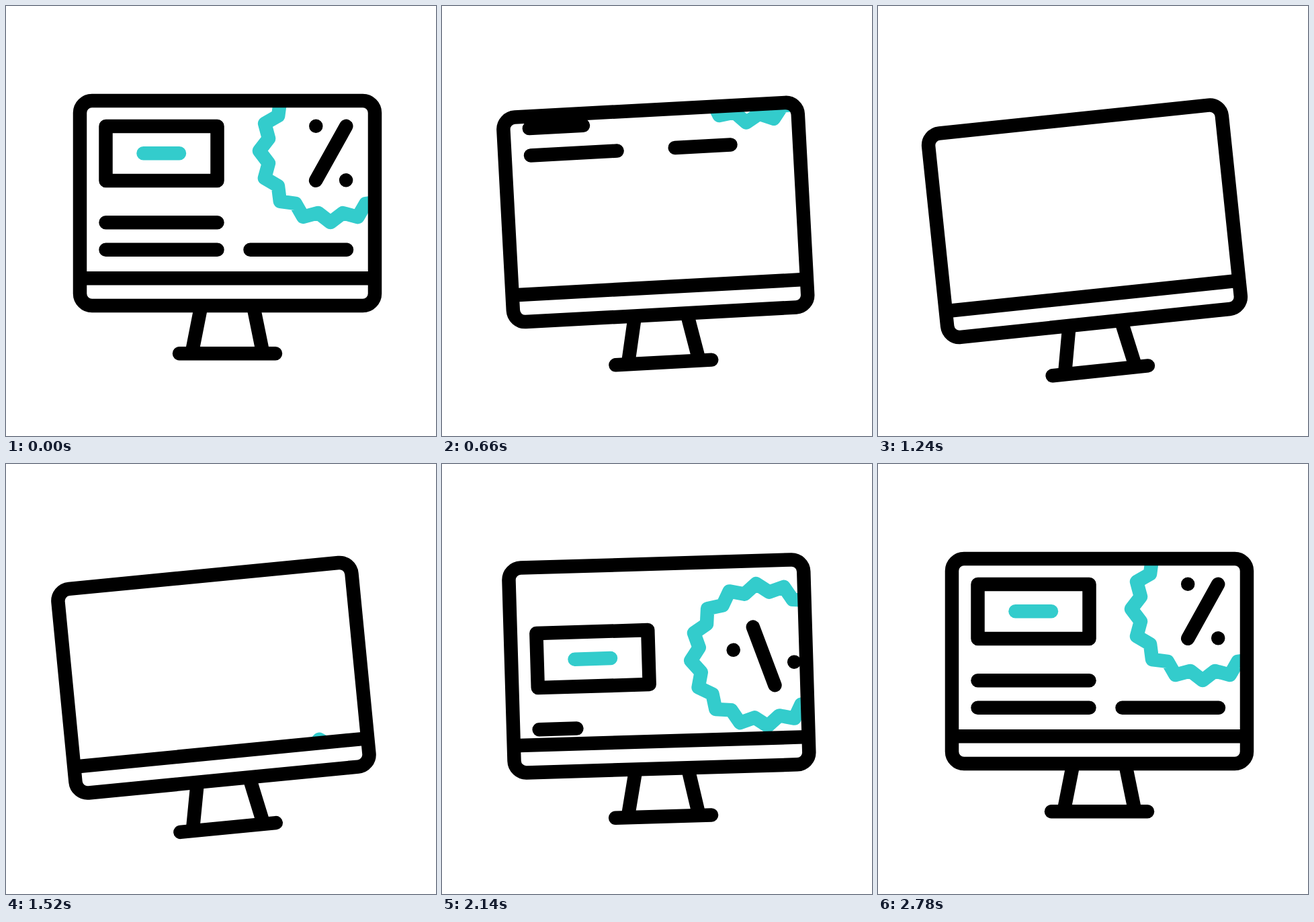
Write an HTML page that moves like this. It is 640 px wide and 640 px high and loops after 3.02 s.

```html
<!DOCTYPE html>
<html lang="en">
<head>
<meta charset="utf-8">
<title>Discount page on a monitor</title>
<style>
  html, body { margin: 0; height: 100%; overflow: hidden; background: #fff; }
  svg { display: block; width: 100vw; height: 100vh; }
  .ink { fill: none; stroke: #000; stroke-width: 20.5; stroke-linecap: round; stroke-linejoin: round; }
  .cyan { stroke: #33cccc; }
</style>
</head>
<body>
<svg viewBox="0 0 640 640">
  <clipPath id="screen"><path d="M110 141H549V405H110Z"/></clipPath>
  <g id="monitor" class="ink">
    <g clip-path="url(#screen)">
      <g id="badge">
        <path id="star" class="cyan"/>
        <path d="M23 -37L-22 44M-22 -37h.01M23 43.5h.01"/>
      </g>
      <g id="page">
        <path d="M148.5 179H314.5V260H148.5Z"/>
        <path class="cyan" d="M204.5 219.3H258"/>
        <path id="line1"/>
        <path id="line2"/>
        <path id="line3"/>
      </g>
    </g>
    <path d="M290.5 446L276.5 517M368 446L382.5 517" stroke-linecap="butt"/>
    <path d="M258 517.3H401"/>
    <path d="M110 405.3H549" stroke-linecap="butt"/>
    <rect x="110" y="141" width="439" height="305" rx="18"/>
  </g>
</svg>
<script>
const LOOP = 3020;
const [monitor, badge, star, page] =
  ["monitor", "badge", "star", "page"].map(id => document.getElementById(id));

// Bars that shrink on the way out and grow on the way back
const bars = [
  { id: "line1", x: 148.5, y: 322.3, len: 166, out: 191, back: 1783 },
  { id: "line2", x: 148.5, y: 362.7, len: 166, out: 379, back: 1870 },
  { id: "line3", x: 363.5, y: 362.7, len: 143.5, out: 249, back: 1870 }
].map(b => ({ ...b, el: document.getElementById(b.id) }));

// Eased progress from 0 to 1, starting at `start` and lasting `span` ms
function ease(t, start, span) {
  const p = Math.min(1, Math.max(0, (t - start) / span));
  return p * p * (3 - 2 * p);
}

// Leave through the top, then come in from below
const scroll = (t, up, down) =>
  t < 1400 ? -up * ease(t, 0, 1060) : down * (1 - ease(t, 1400, 1060));

const points = Array.from({ length: 32 }, (_, i) => {
  const a = i * Math.PI / 16, r = i % 2 ? 94 : 106.3;
  return `${r * Math.cos(a)} ${r * Math.sin(a)}`;
});
star.setAttribute("d", `M${points.join("L")}Z`);

function draw(t) {
  const tilt = 6 * (ease(t, 0, 1300) - ease(t, 1300, 1300));
  monitor.setAttribute("transform", `rotate(${-tilt} 575 518)`);
  page.setAttribute("transform", `translate(0 ${scroll(t, 240, 277)})`);
  const spin = 360 * Math.min(1, t / 2470);
  badge.setAttribute("transform",
    `translate(483.2 ${215.8 + scroll(t, 226, 301)}) rotate(${spin})`);
  for (const b of bars) {
    const shown = 1 - ease(t, b.out, 920) + ease(t, b.back, 920);
    b.el.setAttribute("d", `M${b.x} ${b.y}h${Math.max(0.01, b.len * shown)}`);
  }
}

const begin = performance.now();
function frame() {
  draw((performance.now() - begin) % LOOP);
  requestAnimationFrame(frame);
}
frame();
</script>
</body>
</html>
```
